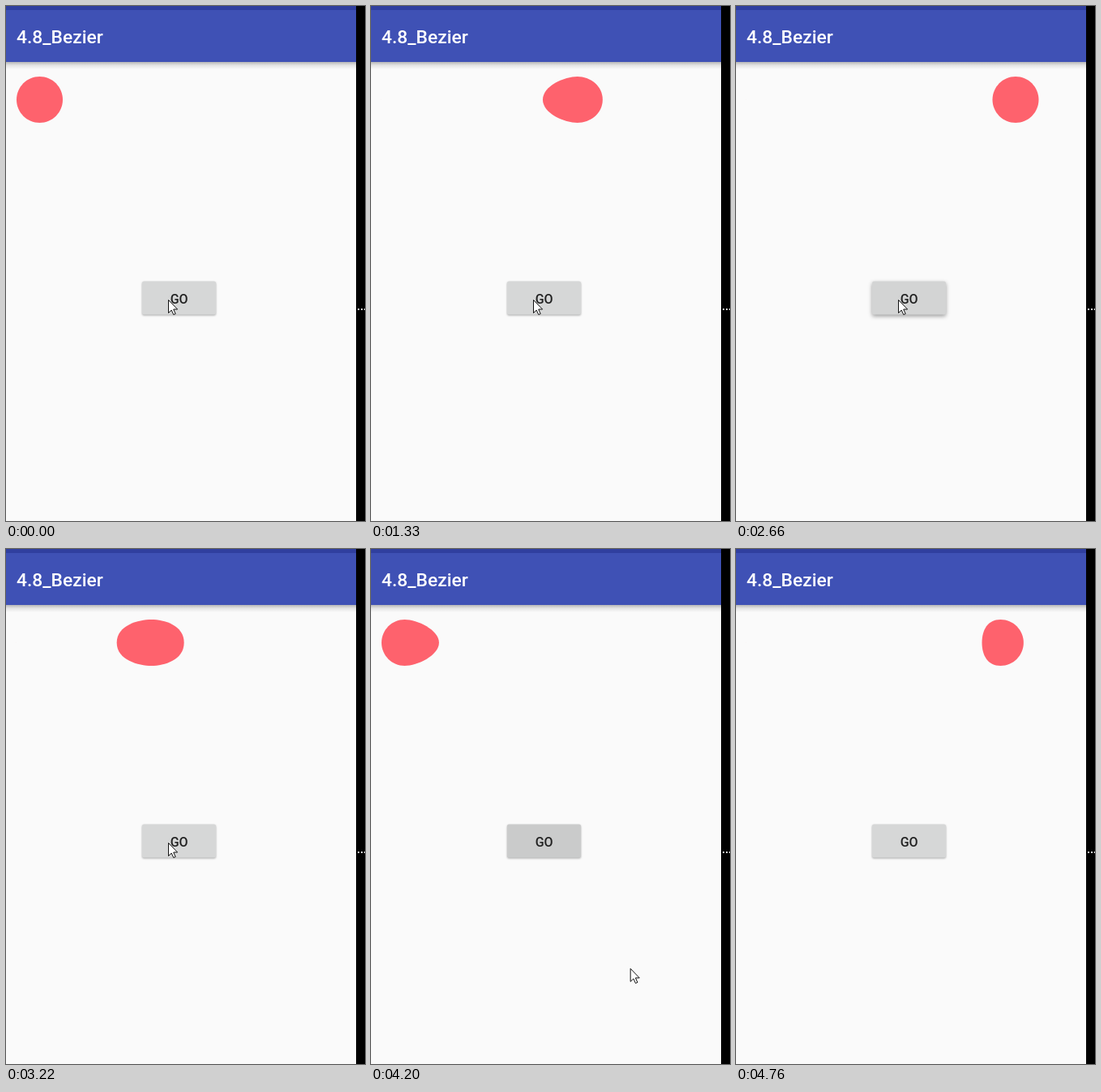
Recreate the animation shown at these times as an HTML page. Size 443x635 px, loop 4.83 s.

```html
<!DOCTYPE html>
<html lang="en">
<head>
<meta charset="utf-8">
<title>Bezier ball</title>
<style>
  html, body { margin: 0; width: 100%; height: 100%; overflow: hidden; background: #fafafa; }
  svg { display: block; }
  text { font-family: Roboto, sans-serif; font-weight: 500; }
</style>
</head>
<body>
<svg width="443" height="635" viewBox="0 0 443 635">
  <defs>
    <linearGradient id="fade" x2="0" y2="1">
      <stop offset="0" stop-opacity=".27"/>
      <stop offset=".45" stop-opacity=".09"/>
      <stop offset="1" stop-opacity="0"/>
    </linearGradient>
  </defs>
  <rect width="443" height="635" fill="#fafafa"/>
  <rect y="69" width="432" height="9" fill="url(#fade)"/>
  <rect width="432" height="69" fill="#3f51b5"/>
  <rect width="432" height="5" fill="#303f9f"/>
  <text x="13" y="46" font-size="22.8" fill="#fff">4.8_Bezier</text>
  <path id="ball" fill="#fe626d"/>
  <rect id="button" x="168" y="339.5" width="91" height="41" rx="2" fill="#d6d7d7"/>
  <rect id="shade" x="168" y="339.5" width="91" height="41" rx="2"/>
  <text x="213.7" y="366.5" font-size="16" text-anchor="middle" fill="#222">GO</text>
  <rect x="432" width="11" height="635"/>
  <path d="M434 374H443" stroke="#ddd" stroke-width="2" stroke-dasharray="2 2"/>
  <path id="cursor" d="M.5 .5V16.5L4.2 13L6.8 18.6L9.2 17.5L6.7 12H11.6Z" fill="#fff" stroke="#111"/>
</svg>
<script>
const LOOP = 4830, STEP = 70;
const $ = id => document.getElementById(id);
const clamp = v => Math.min(1, Math.max(0, v));

// Button press, ball start (ms) and speed (runs per second)
const runs = [
  { press: 630, start: 667, speed: 1 },
  { press: 2660, start: 2735, speed: 1.1 },
  { press: 3920, start: 4025, speed: 1.157 }
];

// Four-curve circle: the front stretches, the middle follows, the back catches up
function ballPath(progress) {
  const r = 28.5, c = r * .551915, cy = 115.5, travel = 343.75;
  const t = .5 - Math.cos(Math.PI * progress) / 2;
  const phase = (from, to) => clamp((t - from) / (to - from));
  const stretch = phase(0, .2), swell = phase(.2, .5), relax = phase(.5, .8);
  const settle = phase(.8, .9), bounce = phase(.9, 1);
  const x = 41.5 + travel * Math.max(0, t - .2);
  const front = x + r + r * stretch;
  const mid = x + r / 2 * (swell + relax);
  const back = x - r + r / 2 * (relax + settle) + Math.sin(Math.PI * bounce) * r * .2;
  const h = c + c * .45 * (swell - relax);
  const top = cy - r, bottom = cy + r;
  return `M${mid} ${bottom}
    C${mid + c} ${bottom} ${front} ${cy + h} ${front} ${cy}
    C${front} ${cy - h} ${mid + c} ${top} ${mid} ${top}
    C${mid - c} ${top} ${back} ${cy - h} ${back} ${cy}
    C${back} ${cy + h} ${mid - c} ${bottom} ${mid} ${bottom}Z`;
}

function drawBall(t) {
  const run = runs.findLast(r => r.start <= t);
  $("ball").setAttribute("d", ballPath(run ? clamp((t - run.start) / 1000 * run.speed) : 0));
}

function drawButton(t) {
  const run = runs.findLast(r => r.press <= t);
  const since = run ? t - run.press : Infinity;
  const ripple = clamp(Math.min((since + 20) / 160, (490 - since) / 350));
  const lift = clamp((280 - since) / 200);
  $("shade").setAttribute("opacity", ripple * .09);
  $("button").style.filter =
    `drop-shadow(0 ${1 + lift * 1.7}px ${.8 + lift * 1.6}px rgba(0,0,0,${.32 + lift * .06}))`;
}

function drawCursor(t) {
  const ease = 1 - (1 - clamp((t - 4060) / 350)) ** 2;
  $("cursor").setAttribute("transform", `translate(${200 + 187 * ease} ${362 + 242 * ease})`);
  $("cursor").setAttribute("visibility", t < 4480 ? "visible" : "hidden");
}

const start = performance.now();
function tick() {
  const elapsed = (performance.now() - start) % LOOP;
  const t = Math.floor(elapsed / STEP) * STEP;
  drawBall(t);
  drawButton(t);
  drawCursor(t);
  requestAnimationFrame(tick);
}
tick();
</script>
</body>
</html>
```
